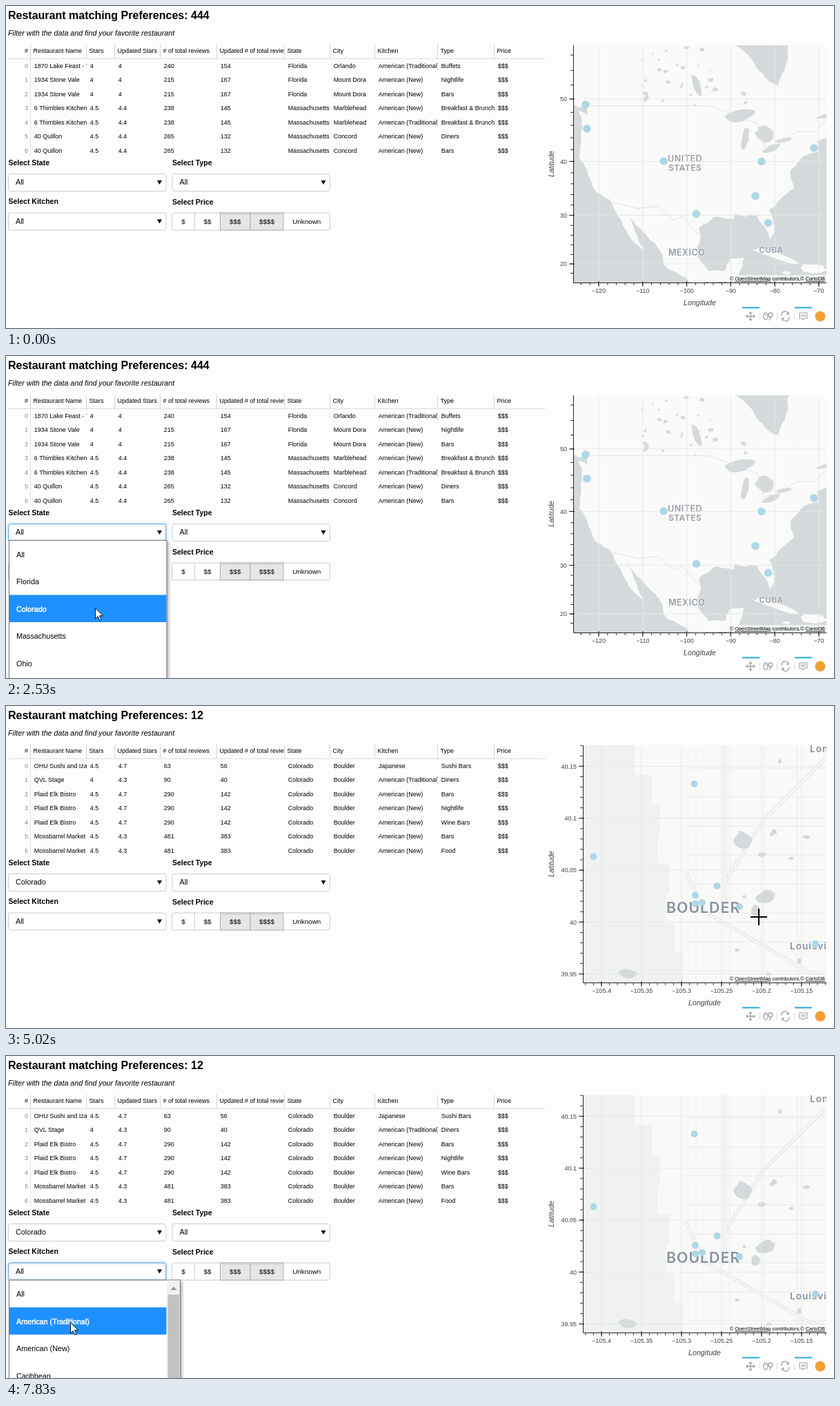
These frames come from a looping animation (1200 px wide and 467 px high, 8000 ms). An HTML page:

```html
<!DOCTYPE html>
<html lang="en">
<head>
<meta charset="utf-8">
<title>Restaurant finder</title>
<style>
html, body { margin: 0; width: 100%; height: 100%; overflow: hidden; background: #fdfdfd; }
#stage { display: block; width: 100vw; height: 100vh; font: 9px "Liberation Sans", Arial, sans-serif; fill: #000; }
.title { font-size: 16px; font-weight: bold; }
.note { font-size: 10.7px; font-style: italic; }
.label { font-size: 10.5px; font-weight: bold; }
.field { font-size: 10.8px; }
.price { font-size: 9.9px; text-anchor: middle; }
.axis { fill: #444; font-size: 10.7px; font-style: italic; text-anchor: middle; }
.tick { fill: #444; }
.place { font-family: Inter, "Open Sans", sans-serif; font-weight: 600; fill: #979da5; letter-spacing: .5px;
  stroke: #fafafa; stroke-width: 2px; stroke-opacity: .6; paint-order: stroke; }
.town { fill: #87929e; letter-spacing: 1px; }
.box { fill: #fff; stroke: #ccc; }
.focus { fill: none; stroke: #66afe9; filter: drop-shadow(0 0 2px #66afe9); }
.list { filter: drop-shadow(2px 2px 2px #0005); }
.hot { fill: #fff; stroke: #fff; stroke-width: .45px; }
.credit { font-size: 7.4px; text-anchor: end; }
.link { text-decoration: underline; }
</style>
</head>
<body>
<svg id="stage" viewBox="0 0 1200 467">
  <text id="title" class="title" x="3" y="18.500"></text>
  <text class="note" x="3" y="43">Filter with the data and find your favorite restaurant</text>
  <g id="tables"></g>
  <g id="form"></g>
  <g id="maps"></g>
  <g id="tools" fill="none" stroke="#a1a6a9" stroke-width="1.4">
    <path stroke="#26aae1" stroke-width="2" d="M1067 437.500h25M1143 437.500h25"/>
    <path stroke="#ddd" stroke-width="1" d="M1092.500 445v10M1117.500 445v10M1142.500 445v10"/>
    <path d="M1079 444v12M1073 450h12M1077 446l2-2 2 2M1077 454l2 2 2-2M1075 448l-2 2 2 2M1083 448l2 2-2 2"/>
    <ellipse cx="1101" cy="450" rx="3" ry="5"/><path d="M1101 447v2"/>
    <circle cx="1108" cy="448" r="3"/><path d="M1109 451l-3 5"/>
    <path d="M1124 449a5 5 0 0 1 10-2M1135 451a5 5 0 0 1-10 2M1134 444v3h-3M1125 456v-3h3"/>
    <path d="M1150 445h11v8h-4l-2 2-2-2h-3zM1152 448h7M1152 450h7" stroke-width="1.1"/>
    <circle cx="1180" cy="450" r="7.5" fill="#f0a030" stroke="none"/>
  </g>
  <g id="lists"></g>
  <g id="pointer">
    <path id="arrow" d="M.5.5v15.500l3.600-3.400 2.500 5.700 2.400-1-2.500-5.600h5z" fill="#fff" stroke="#111"/>
    <path id="cross" d="M-12 0h24M0-12v24" stroke="#000" stroke-width="2"/>
    <circle id="halo" r="15" fill="#ffee00" opacity=".58"/>
  </g>
</svg>
<script>
const byId = id => document.getElementById(id);
const show = (node, on) => { node.style.display = on ? '' : 'none'; };
const range = (from, to, step) => Array.from({ length: Math.floor((to - from) / step + 1.001) }, (_, i) => from + i * step);
function seeded(seed) {
  return () => (seed = seed * 16807 % 2147483647) / 2147483647;
}
function el(parent, tag, attrs = {}, content) {
  const node = document.createElementNS('http://www.w3.org/2000/svg', tag);
  for (const key in attrs) node.setAttribute(key, attrs[key]);
  if (content !== undefined) node.textContent = content;
  parent.append(node);
  return node;
}
const text = (parent, x, y, content, attrs) => el(parent, 'text', { x, y, ...attrs }, content);
const line = (parent, d, stroke, attrs) => el(parent, 'path', { d, stroke, fill: 'none', ...attrs });
const polygon = (parent, points, fill) =>
  el(parent, 'polygon', { points: points.map(p => p.map(v => v.toFixed(1))).join(' '), fill });

// Table
const ROW_STEP = 20.5;
const columns = [['Restaurant Name', 81], ['Stars', 41], ['Updated Stars', 66], ['# of total reviews', 82],
  ['Updated # of total reviews', 98], ['State', 66], ['City', 65], ['Kitchen', 91], ['Type', 82], ['Price', 74]];

function cells(parent, values, y, indent, rule) {
  let x = 36;
  columns.forEach(([, width], i) => {
    const clip = el(parent, 'svg', { x, y: y - 12, width, height: 18 });
    text(clip, indent, 12, values[i]);
    if (rule) line(parent, `M${x - .5} 56v20`, '#d4d4d4');
    x += width;
  });
}
function table(rows) {
  const g = el(byId('tables'), 'g');
  text(g, 32, 68.2, '#', { 'text-anchor': 'end' });
  cells(g, columns.map(([name]) => name), 68.2, 3.4, true);
  line(g, 'M3 76.500H782', '#ddd');
  line(g, 'M35.500 77V217', '#e2e2e2');
  rows.forEach((row, i) => {
    const y = 89.7 + i * ROW_STEP;
    text(g, 32, y, i, { fill: '#888', 'text-anchor': 'end' });
    cells(g, [...row.split('|'), '$$$'], y, 4.8);
  });
  return g;
}
const dora = '1934 Stone Vale|4|4|215|167|Florida|Mount Dora|American (New)|';
const corner = '6 Thimbles Kitchen|4.5|4.4|238|145|Massachusetts|Marblehead|American ';
const pond = '40 Quillon|4.5|4.4|265|132|Massachusetts|Concord|American (New)|';
const bistro = 'Plaid Elk Bistro|4.5|4.7|290|142|Colorado|Boulder|American (New)|';
const market = 'Mossbarrel Market|4.5|4.3|481|383|Colorado|Boulder|American (New)|';
const allTable = table([
  '1870 Lake Feast - Tow|4|4|240|154|Florida|Orlando|American (Traditional)|Buffets',
  dora + 'Nightlife', dora + 'Bars',
  corner + '(New)|Breakfast & Brunch', corner + '(Traditional)|Breakfast & Brunch',
  pond + 'Diners', pond + 'Bars']);
const boulderTable = table([
  'OHU Sushi and Izakaya|4.5|4.7|63|56|Colorado|Boulder|Japanese|Sushi Bars',
  'QVL Stage|4|4.3|90|40|Colorado|Boulder|American (Traditional)|Diners',
  bistro + 'Bars', bistro + 'Nightlife', bistro + 'Wine Bars', market + 'Bars', market + 'Food']);

// Form
const form = byId('form');
function select(x, y, label) {
  text(form, x + .5, y - 12.3, label, { class: 'label' });
  const rect = { x: x + .5, y: y + .5, width: 228.5, height: 25, rx: 3 };
  el(form, 'rect', { ...rect, class: 'box' });
  const focus = el(form, 'rect', { ...rect, class: 'focus' });
  el(form, 'path', { d: `M${x + 216} ${y + 10}h7l-3.500 6z` });
  show(focus, false);
  return { focus, value: text(form, x + 11, y + 16, 'All', { class: 'field' }) };
}
const stateSelect = select(3, 243, 'Select State');
const kitchenSelect = select(3, 299.5, 'Select Kitchen');
select(240.5, 243, 'Select Type');

text(form, 241, 287.5, 'Select Price', { class: 'label' });
el(form, 'rect', { x: 240.5, y: 300, width: 229, height: 25, rx: 3, class: 'box' });
let buttonX = 240.5;
for (const [name, width] of [['$', 33], ['$$', 37], ['$$$', 43.5], ['$$$$', 48], ['Unknown', 67.5]]) {
  if (name.length === 2) line(form, `M${buttonX} 300v25`, '#ccc');
  if (/^\${3}/.test(name)) {
    el(form, 'rect', { x: buttonX, y: 300, width, height: 25, fill: '#e6e6e6', stroke: '#adadad' });
    line(form, `M${buttonX + 1} 301.500h${width - 2}`, '#d2d2d2', { 'stroke-width': 2 });
  }
  text(form, buttonX + width / 2, 315.5, name, { class: 'price' });
  buttonX += width;
}

// Drop-down lists
const OPTION = 39.5;
function dropdown(top, width, items) {
  const g = el(byId('lists'), 'g', { class: 'list' });
  el(g, 'rect', { x: 4.5, y: top, width, height: 210, fill: '#fff', stroke: '#777' });
  const bar = el(g, 'rect', { x: 5, width: 227.5, height: OPTION, fill: '#1e90ff' });
  const labels = items.map((item, i) => text(g, 15, top + 24.3 + i * OPTION, item, { class: 'field' }));
  return {
    g,
    highlight(y) {
      const hot = Math.max(0, Math.floor((y - top) / OPTION));
      bar.setAttribute('y', top + hot * OPTION);
      labels.forEach((label, i) => label.classList.toggle('hot', i === hot));
    }
  };
}
const stateList = dropdown(267.5, 228.5, ['All', 'Florida', 'Colorado', 'Massachusetts', 'Ohio']);
const kitchenList = dropdown(325, 248, ['All', 'American (Traditional)', 'American (New)', 'Caribbean']);
el(kitchenList.g, 'rect', { x: 233, y: 325.5, width: 19, height: 150, fill: '#f1f1f1' });
el(kitchenList.g, 'rect', { x: 234.5, y: 346, width: 16.5, height: 130, fill: '#c1c1c1' });
el(kitchenList.g, 'path', { d: 'M238.500 339.500h9l-4.500-5z', fill: '#999' });

// Maps
const WATER = '#d4dadc', LAND = '#fafaf9';
const TOP = 57, BOTTOM = 401, RIGHT = 1189;

function plot({ left, xTicks, yTicks, xMinor, yMinor, tiles, dots, radius }) {
  const g = el(byId('maps'), 'g');
  const size = { width: RIGHT - left, height: BOTTOM - TOP };
  const map = el(g, 'svg', { x: left, y: TOP, ...size, viewBox: `${left} ${TOP} ${size.width} ${size.height}` });
  tiles(map);
  line(map, xTicks.map(([x]) => `M${x} ${TOP}V${BOTTOM}`).join('') + yTicks.map(([y]) => `M${left} ${y}H${RIGHT}`).join(''),
    '#e5e5e5', { opacity: .8 });
  dots.forEach(([cx, cy]) => el(map, 'circle', { cx, cy, r: radius, fill: '#add8e6' }));
  el(map, 'rect', { x: 1046, y: 390, width: 143, height: 11, fill: '#fff', opacity: .6 });
  const credit = text(map, 1187, 398, '', { class: 'credit' });
  ['© ', 'OpenStreetMap', ' contributors,© ', 'CartoDB']
    .forEach((part, i) => el(credit, 'tspan', { class: i % 2 ? 'link' : '' }, part));

  line(g, `M${left + .5} ${TOP}V401.500H${RIGHT}`, '#222');
  line(g, xMinor.map(x => `M${x} 401v4`).join('') + yMinor.map(y => `M${left} ${y}h-4`).join(''), '#333');
  line(g, xTicks.map(([x]) => `M${x} 399v8`).join('') + yTicks.map(([y]) => `M${left + 2} ${y}h-8`).join(''), '#222');
  xTicks.forEach(([x, name]) => text(g, x, 416, name, { class: 'tick', 'text-anchor': 'middle' }));
  yTicks.forEach(([y, name]) => text(g, left - 9, y + 3.2, name, { class: 'tick', 'text-anchor': 'end' }));
  text(g, (left + RIGHT) / 2, 433.5, 'Longitude', { class: 'axis' });
  text(g, 0, 0, 'Latitude', { class: 'axis', transform: 'translate(794 229)rotate(-90)' });
  return g;
}
const ticks = (values, toPixel) => values.map(v => [toPixel(v), String(+v.toFixed(2)).replace('-', '−')]);
const place = (g, x, y, name, size, cls = '') => text(g, x, y, name, { class: 'place ' + cls, 'font-size': size });

// Irregular ellipse
function blob(g, random, x, y, rx, ry, tilt, fill) {
  const turn = tilt * Math.PI / 180;
  polygon(g, range(0, 6, .45).map(angle => {
    const k = .85 + random() * .35, u = Math.cos(angle) * rx * k, v = Math.sin(angle) * ry * k;
    return [x + u * Math.cos(turn) - v * Math.sin(turn), y + u * Math.sin(turn) + v * Math.cos(turn)];
  }), fill);
}
// Midpoint displacement of a closed outline
function roughen(points, amount, random) {
  return points.flatMap(([x, y], i) => {
    const [u, v] = points[(i + 1) % points.length], k = (random() - .5) * amount;
    return [[x, y], [(x + u) / 2 + (v - y) * k, (y + v) / 2 - (u - x) * k]];
  });
}

// Web Mercator
const SCALE = 6.38;
const lonX = lon => 859 + (lon + 120) * SCALE;
const latY = lat => 504.3 - Math.asinh(Math.tan(lat * Math.PI / 180)) * 180 / Math.PI * SCALE;
// Key points as "degrees west,degrees north"
const project = points => points.split(' ').map(p => p.split(',')).map(([west, north]) => [lonX(-west), latY(+north)]);
const pacific = '132,60 132,51 122.6,49 122.6,47.5 124.6,48.3 124,44 124.3,40.4 120.6,34.5 117.2,32.6 114.5,28 112,24.7 '
  + '109.6,23 111.9,27 114.8,31.8 112.3,29 109.2,25.9 105.5,22 105.3,20 102,17.9 95,14';
const gulf = '87,14 88.5,15.9 87,21.3 90.3,21 91.2,18.6 95,18.4 97.8,22.5 97.2,27.5 94,29.6 89.3,29.2 89,30.3 84.2,30 82.7,28 81,25.1';
const atlantic = '80.2,26.5 81.4,31 75.6,35.2 76.3,38.5 74.2,40.3 70.2,41.7 70.5,43.4 60,45 60,49 71,47 60,51 '
  + '60,60 78,60 77,56 79.2,52 82.2,53 85,55.3 95,60';

function continent(g) {
  const random = seeded(11);
  el(g, 'rect', { x: 822, y: TOP, width: 367, height: 344, fill: WATER });
  let coast = project([pacific, gulf, atlantic].join(' '));
  for (let pass = 0; pass < 3; pass++) coast = roughen(coast, .2, random);
  polygon(g, coast, LAND);

  const island = (...shape) => blob(g, random, ...shape, LAND);
  island(825, 139, 14, 4, 35);
  island(1117, 363, 35, 4, 18);
  island(1170, 381, 19, 6, 5);
  island(1131, 387, 6, 2, 5);

  const lake = (...shape) => blob(g, random, ...shape, WATER);
  lake(1063, 159, 22, 8, -10);
  lake(1071, 193, 5, 17, 12);
  lake(1099, 186, 12, 11, 30);
  lake(1108, 207, 14, 4, -22);
  lake(1127, 195, 11, 3, -10);
  lake(1001, 115, 5, 17, -20);
  for (let i = 0; i < 70; i++) {
    const x = 910 + random() * 240, y = 60 + random() * 85, size = .6 + random() ** 3 * 3;
    if (x < 1030 || y > 122) lake(x, y, size * 1.5, size, random() * 90 - 60);
  }

  const border = project('123,49 95,49 84,46.3 82.5,42.5 79,43 75,45 71,45 68,47').join('L');
  const southBorder = project('117,32.5 111,31.3 106.5,31.8 103,29 101,29.8 97.2,26').join('L');
  line(g, `M${border}M${southBorder}`, '#e2e1e4');
  place(g, 959, 225.5, 'UNITED', 12.5);
  place(g, 960, 238.5, 'STATES', 12);
  place(g, 960, 361.5, 'MEXICO', 12.5);
  place(g, 1091.5, 358, 'CUBA', 11.5);
  place(g, 1012, 406.5, 'GUATEMALA', 9);
}

function city(g) {
  const random = seeded(5);
  el(g, 'rect', { x: 836, y: TOP, width: 353, height: 344, fill: '#f9f9f8' });
  for (const y of range(TOP, BOTTOM, 43))
    el(g, 'rect', { x: 836, y, width: 75 + (y - TOP) * .2 + random() * 25, height: 43.5, fill: '#eff2f0' });
  line(g, range(1000, 1180, 49).map(x => `M${x} ${TOP}V${BOTTOM}`).join('') + range(90, 390, 42).map(y => `M985 ${y}H${RIGHT}`).join(''),
    '#f0f0ef', { 'stroke-width': 1.5 });
  const roads = `M1042 ${TOP}V300M1189 75L1098 165 1042 255M985 240L1012 298 1160 384 1189 394`;
  line(g, roads, '#e3e5e5', { 'stroke-width': 5 });
  line(g, roads, '#f9f9f9', { 'stroke-width': 2.5 });
  const lake = (...shape) => blob(g, random, ...shape, WATER);
  lake(1067, 195, 12, 13, 20);
  lake(1101, 277, 14, 9, -20);
  lake(1086, 296, 6, 8, 0);
  lake(901, 388, 13, 6, 10);
  for (let i = 0; i < 10; i++) lake(1050 + random() * 135, 80 + random() * 310, 2 + random() * 4, 2 + random() * 2, 0);
  place(g, 957, 300, 'BOULDER', 21.3, 'town');
  place(g, 1136, 353, 'Louisville', 13.6, 'town');
  place(g, 1165, 67, 'Longmont', 13.6, 'town');
}

const usMap = plot({
  left: 822, tiles: continent, radius: 5.8,
  xTicks: ticks(range(-120, -70, 10), lonX), yTicks: ticks(range(20, 50, 10), latY),
  xMinor: range(-124, -70, 2).map(lonX), yMinor: range(18, 56, 2).map(latY),
  dots: [[840, 143], [842, 178], [953, 225], [1095, 225.5], [1171, 206], [1086, 275.5], [1000.5, 301.5], [1104.5, 314.5]]
});
const cityX = lon => 863 + (lon + 105.4) * 1160;
const cityY = lat => 313.3 - (lat - 40) * 1506;
const boulderMap = plot({
  left: 836, tiles: city, radius: 5,
  xTicks: ticks(range(-105.4, -105.15, .05), cityX), yTicks: ticks(range(39.95, 40.15, .05), cityY),
  xMinor: range(-105.42, -105.12, .01).map(cityX), yMinor: range(39.95, 40.17, .01).map(cityY),
  dots: [[997.5, 113], [851.5, 218.5], [1030.5, 261], [999, 274.5], [999, 287], [1009, 285], [1063, 291], [1173, 345]]
});

// Each move eases from the previous place; equal start and end is a jump
const STEP = 70;
const moves = [
  { start: 420, end: 420, x: 309, y: 310 },
  { start: 500, end: 500, x: 294, y: 295 },
  { start: 760, end: 1180, x: 199, y: 263 },
  { start: 1770, end: 2530, x: 129, y: 366 },
  { start: 4400, end: 4880, x: 1121, y: 296 },
  { start: 4950, end: 5020, x: 1091, y: 306 },
  { start: 5230, end: 5440, x: 1072, y: 436 },
  { start: 5710, end: 5710, x: 205, y: 413 },
  { start: 5780, end: 5930, x: 149, y: 343 },
  { start: 6190, end: 6260, x: 128, y: 309 },
  { start: 6400, end: 6400, x: 128, y: 314 },
  { start: 7010, end: 7700, x: 93, y: 386 }
];
const easeOut = p => 1 - (1 - p) ** 2;
function pointerAt(t) {
  const index = moves.findLastIndex(move => move.start <= t);
  if (index < 0) return [0, 0];
  const { start, end, x, y } = moves[index];
  const from = moves[index - 1] || moves[0];
  const steps = Math.round((end - start) / STEP) + 1;
  const p = easeOut(Math.min(1, (Math.floor((t - start) / STEP) + 1) / steps));
  return [Math.round(from.x + (x - from.x) * p), Math.round(from.y + (y - from.y) * p)];
}
const within = (t, from, to) => t >= from && t < to;
const clicks = [1310, 3740, 6480];

function frame() {
  const t = performance.now() % 8000;
  const [x, y] = pointerAt(t);
  const filtered = t >= 4070, zoomed = t >= 4140;

  byId('title').textContent = 'Restaurant matching Preferences: ' + (filtered ? 12 : 444);
  show(allTable, !filtered);
  show(boulderTable, filtered);
  show(usMap, !zoomed);
  show(boulderMap, zoomed);

  stateSelect.value.textContent = t < 3870 ? 'All' : 'Colorado';
  show(stateSelect.focus, within(t, 1310, 3870));
  show(kitchenSelect.focus, t >= 6480);
  show(stateList.g, within(t, 1370, 3870));
  show(kitchenList.g, t >= 6540);
  stateList.highlight(y);
  kitchenList.highlight(y);

  const overMap = x > 836 && y < BOTTOM;
  show(byId('pointer'), t >= 420 && !within(t, 5510, 5710));
  byId('pointer').setAttribute('transform', `translate(${x} ${y})`);
  show(byId('arrow'), !overMap);
  show(byId('cross'), overMap);
  show(byId('halo'), clicks.some(click => within(t, click, click + 130)));
  requestAnimationFrame(frame);
}
frame();
</script>
</body>
</html>
```
